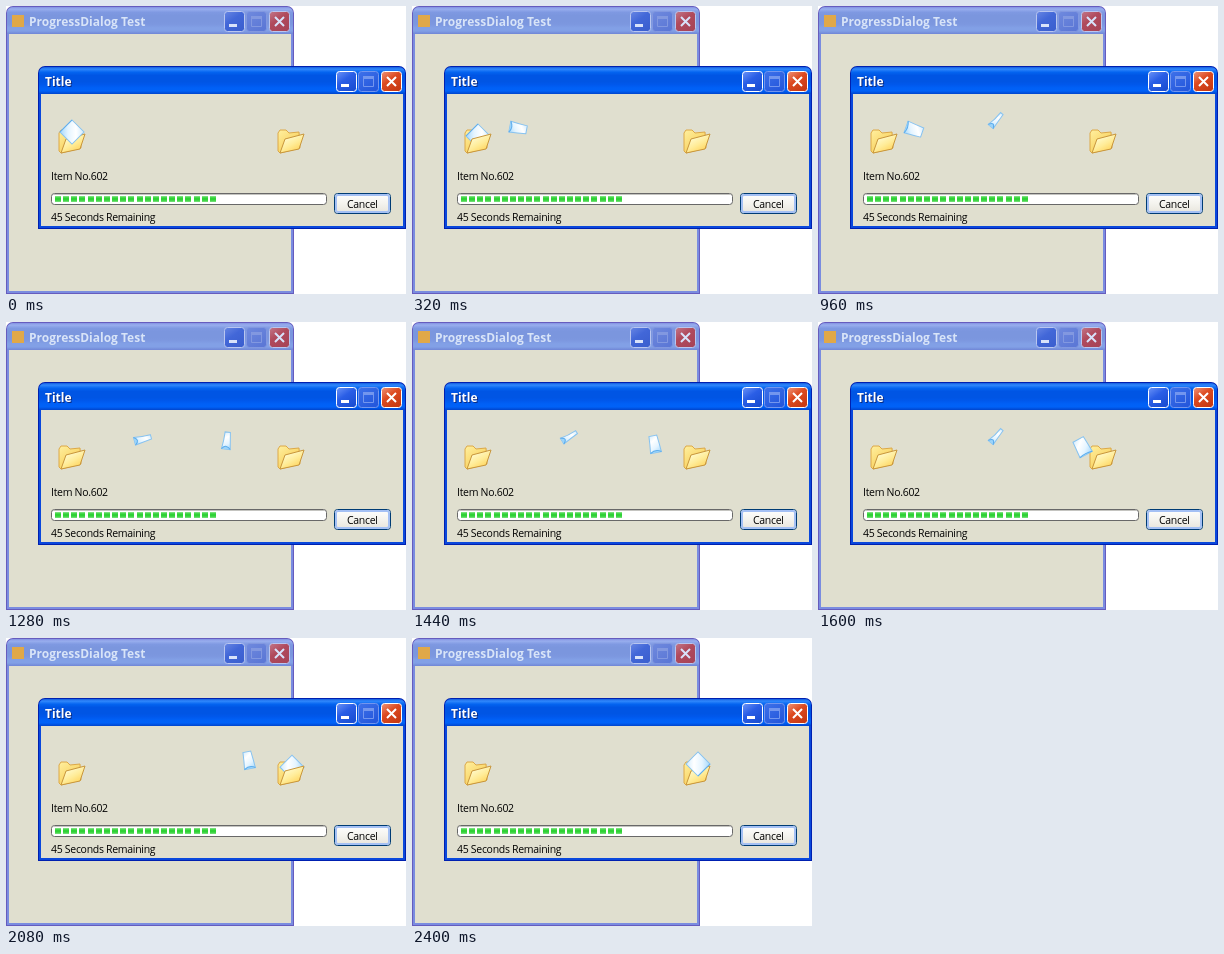
These frames come from a looping animation (400 by 288 pixels, 2480 ms). An HTML page with a canvas:

```html
<!DOCTYPE html>
<html lang="en">
<head>
<meta charset="utf-8">
<title>Progress dialog</title>
<style>
  html, body { margin: 0; width: 100%; height: 100%; overflow: hidden; background: #fff; }
  canvas { display: block; }
</style>
</head>
<body>
<canvas id="stage" width="400" height="288"></canvas>
<script>
const ctx = document.getElementById('stage').getContext('2d');
const STEP = 80, STEPS = 31, FACE = '#e0dfcf';
const LEAVE = 1, ARRIVE = 22, SINK = 5;   // steps in the life of a sheet
const FOLDERS = [53, 272];

function gradient(x0, y0, x1, y1, ...colors) {
  const g = ctx.createLinearGradient(x0, y0, x1, y1);
  colors.forEach((c, i) => g.addColorStop(i / (colors.length - 1), c));
  return g;
}

function paint(fill, stroke, width = 1) {
  if (fill) { ctx.fillStyle = fill; ctx.fill(); }
  if (stroke) { ctx.strokeStyle = stroke; ctx.lineWidth = width; ctx.stroke(); }
}

function rect(x, y, w, h, fill) {
  ctx.fillStyle = fill;
  ctx.fillRect(x, y, w, h);
}

function box(x, y, w, h, radius, fill, stroke, width) {
  ctx.beginPath();
  ctx.roundRect(x, y, w, h, radius);
  paint(fill, stroke, width);
}

function polygon(points, fill, stroke) {
  ctx.beginPath();
  points.forEach(([x, y]) => ctx.lineTo(x, y));
  ctx.closePath();
  paint(fill, stroke);
}

function text(str, x, y, color = '#000', font = '10.5px', spacing = '-0.3px') {
  ctx.font = `${font} "Open Sans", sans-serif`;
  ctx.letterSpacing = spacing;
  ctx.fillStyle = color;
  ctx.fillText(str, x, y);
}

function captionButton(x, y, kind, active) {
  const dim = active ? '#7396ee' : '#8298e0';
  const glyph = kind === 'max' ? dim : active ? '#fff' : '#d8e2fa';
  const fill = kind === 'close'
    ? (active ? ['#f09a80', '#dd4a20', '#c83a14'] : ['#c47a8c', '#b04a5c', '#a84458'])
    : kind === 'max'
      ? (active ? ['#3f72ea', '#2558dc'] : ['#708ade', '#5c78d6'])
      : (active ? ['#7097f8', '#2a5ee6', '#1b4fd4'] : ['#6a88e4', '#4267d8', '#3c60d0']);
  box(x + .5, y + .5, 20, 20, 3, gradient(x, y, x + 14, y + 20, ...fill),
    kind === 'max' ? dim : active ? '#fff' : '#b9c6f0');
  if (kind === 'min') rect(x + 5, y + 13, 8, 3, glyph);
  if (kind === 'max') {
    rect(x + 5, y + 5, 11, 3, glyph);
    box(x + 5.5, y + 5.5, 10, 10, 0, null, glyph);
  }
  if (kind === 'close') {
    ctx.beginPath();
    ctx.moveTo(x + 6, y + 6); ctx.lineTo(x + 15, y + 15);
    ctx.moveTo(x + 15, y + 6); ctx.lineTo(x + 6, y + 15);
    paint(null, glyph, 2);
  }
}

function drawWindow(x, y, w, h, active, title, titleX) {
  const bar = active
    ? ['#0848d0', '#3088fc', '#0464f0', '#0055e4', '#0055e4', '#0055e4', '#0058ec', '#0060f6', '#0062f8', '#0044cc']
    : ['#7a84dc', '#98aeee', '#7f99e2', '#7b96de', '#7b96de', '#7b96de', '#7d98e0', '#82a0e6', '#82a0e6', '#7086d6'];
  box(x, y, w, h, [7, 7, 0, 0], active ? '#0020b0' : '#665cbe');
  box(x + 1, y + 1, w - 2, h - 2, [6, 6, 0, 0], active ? '#0a48dc' : '#7a8ce0');
  box(x + 1, y + 1, w - 2, 27, [6, 6, 0, 0], gradient(0, y, 0, y + 28, ...bar));
  rect(x + 3, y + 28, w - 6, h - 31, FACE);
  if (active) text(title, titleX + 1, y + 21, '#0a2a80', 'bold 12px', '0px');
  text(title, titleX, y + 20, active ? '#fff' : '#d8e4f8', 'bold 12px', '0px');
  ['min', 'max', 'close'].forEach((kind, i) =>
    captionButton(x + w - 70 + Math.floor(i * 22.5), y + 5, kind, active));
}

function drawScene() {
  rect(0, 0, 400, 288, '#fff');
  drawWindow(0, 0, 288, 288, false, 'ProgressDialog Test', 23);
  rect(6, 9, 12, 12, '#e0a848');

  drawWindow(32, 60, 368, 163, true, 'Title', 39);
  text('Item No.602', 45, 174);
  text('45 Seconds Remaining', 45, 215);

  box(45.5, 187.5, 275, 11, 3, '#fff', '#686868');
  rect(47, 188, 272, 1, '#c4c4c0');
  for (let i = 0; i < 20; i++)
    rect(49 + Math.round(i * 8.15), 190, 6, 6, gradient(0, 190, 0, 196, '#8fe690', '#2fd235', '#2fd235', '#7fe282'));

  box(328.5, 187.5, 56, 20, 3, gradient(0, 187, 0, 208, '#fff', '#f4f3ee', '#e6e3da'), '#003c74');
  box(330, 189, 53, 17, 2, null, '#a4c0f4', 2);
  text('Cancel', 341, 202);
}

function folderBack(x) {
  const y = 124;
  polygon([[x, y + 3], [x + 2, y], [x + 8, y], [x + 11, y + 3], [x + 21, y + 2], [x + 22, y + 18], [x + 2, y + 23], [x, y + 21]],
    gradient(x, y, x + 18, y + 22, '#fff0a0', '#f6c84c'), '#dca848');
}

function folderFront(x) {
  const y = 124;
  polygon([[x + 7, y + 9], [x + 26, y + 4], [x + 21, y + 19], [x + 2, y + 23]],
    gradient(x + 8, y + 6, x + 18, y + 24, '#fffcd4', '#ffec98', '#ffd052'), '#c8963c');
}

// A sheet half turns along an arc between the folders, thinnest at the top
function drawSheet(p) {
  const s = Math.min(1, Math.max(0, (p - LEAVE) / (ARRIVE - LEAVE)));
  const lift = Math.sin(Math.PI * s);
  const sunk = Math.max(0, LEAVE - p, p - ARRIVE);
  const half = 8.5, thick = 8.5 - 5.3 * lift, tip = thick * (1 - .5 * lift);

  ctx.save();
  ctx.translate(66 + 220 * s - 3 * lift, 126 - 12 * lift * lift + sunk * .8);
  ctx.rotate(Math.PI * (.25 - s));
  ctx.beginPath();
  ctx.moveTo(-half, -thick);
  ctx.quadraticCurveTo(0, -thick + 2 * lift, half, -tip);
  ctx.lineTo(half, tip);
  ctx.quadraticCurveTo(0, thick - lift, -half, thick);
  ctx.closePath();
  paint(gradient(-half, thick, half, -thick, '#a4d8fc', '#e4f4ff', '#fff', '#d0eafc'), '#86c2f0');

  // curled near edge
  ctx.beginPath();
  ctx.moveTo(-half, -thick);
  ctx.quadraticCurveTo(-half + 7 * lift, 0, -half, thick);
  paint('#9cd4fa', '#5cacec');
  ctx.restore();
}

function draw(time) {
  const k = Math.floor(time / STEP) % STEPS;
  const sheets = [k < 7 ? k + 1 : k, k - 8].filter(p => p >= LEAVE - SINK - 2 && p <= ARRIVE + SINK);
  const tucked = p => p < LEAVE || p > ARRIVE;
  drawScene();
  FOLDERS.forEach(folderBack);
  sheets.filter(tucked).forEach(drawSheet);
  FOLDERS.forEach(folderFront);
  sheets.filter(p => !tucked(p)).forEach(drawSheet);
}

const start = performance.now();
function tick() {
  draw(performance.now() - start);
  requestAnimationFrame(tick);
}
tick();
</script>
</body>
</html>
```
